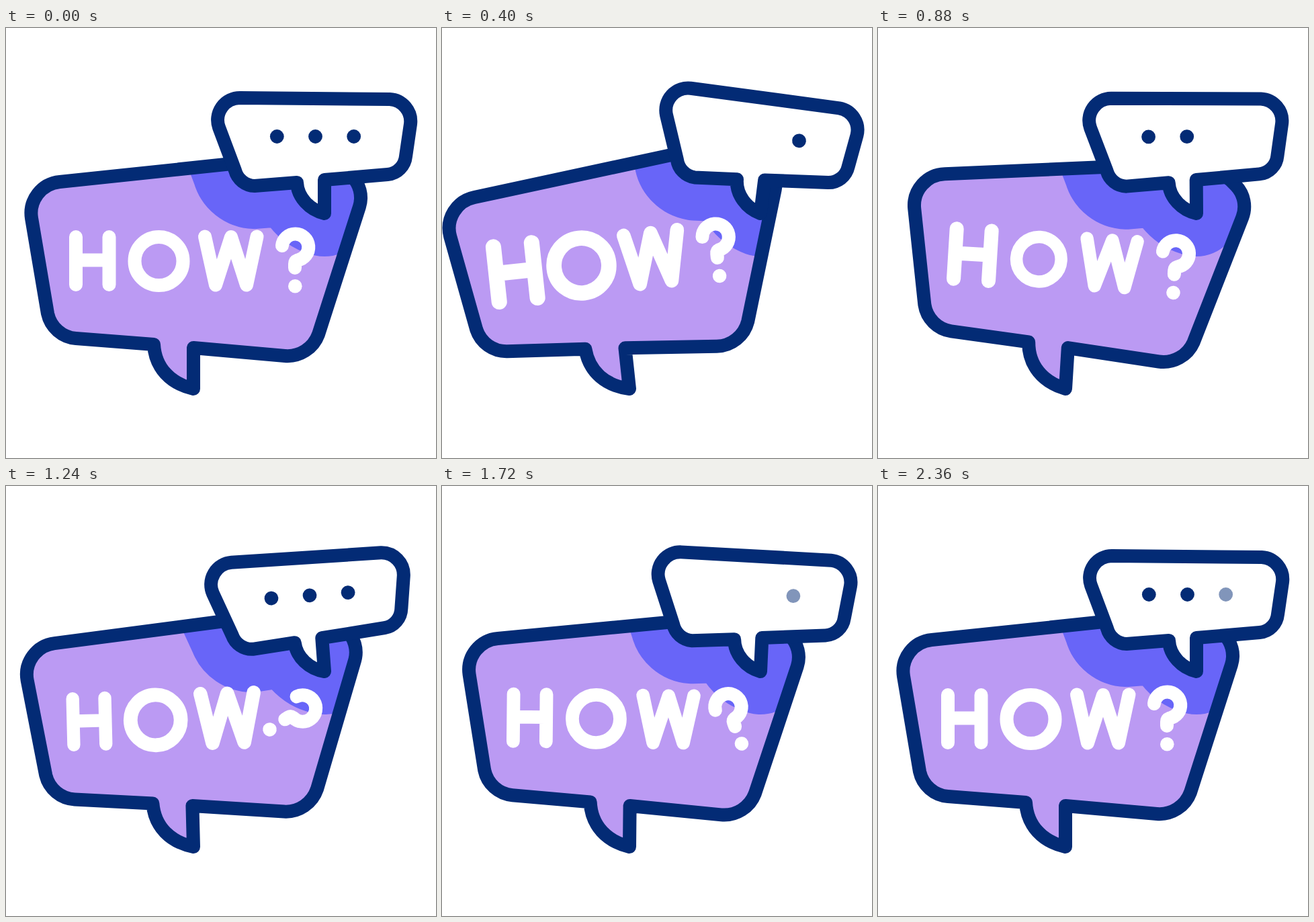
These frames come from a looping animation (640 px wide and 640 px high, 2400 ms). An HTML page:

```html
<!DOCTYPE html>
<html lang="en">
<head>
<meta charset="utf-8">
<title>How?</title>
<style>
  html, body { margin: 0; width: 100%; height: 100%; overflow: hidden; background: #fff; }
  svg { display: block; width: 100%; height: 100%; }
  .line { fill: none; stroke: #032b75; stroke-width: 20; stroke-linejoin: round; }
  .type { fill: none; stroke: #fff; stroke-width: 20; stroke-linecap: round; stroke-linejoin: round; }
  .shade { fill: #6865f8; stroke: #6865f8; stroke-width: 128; stroke-linejoin: round; }
</style>
</head>
<body>
<svg viewBox="0 0 640 640" role="img" aria-label="HOW?">
  <defs>
    <path id="bigShape" d="M80 229 L450 190 Q490 196 514 220 A45 45 0 0 1 526 266 L465 456
      A49 49 0 0 1 415 488 L279 476 V537 C245 529 222 506 220 471 L104 462
      A47 47 0 0 1 62 425 L38 283 A47 47 0 0 1 80 229 Z"/>
    <path id="smallShape" d="M348 104 L571 106 A33 33 0 0 1 602 143 L595 191
      A30 30 0 0 1 568 218 L474 226 V276 C452 271 434 252 433 230 L370 235
      A31 31 0 0 1 341 212 L317 148 A33 33 0 0 1 348 104 Z"/>
    <clipPath id="inside"><use href="#bigShape" class="big"/></clipPath>
  </defs>

  <use href="#bigShape" class="big" fill="#bb9af3"/>
  <g clip-path="url(#inside)"><use href="#smallShape" class="small shade"/></g>
  <g class="big">
    <use href="#bigShape" class="line"/>
    <g class="type">
      <path id="h" d="M104 311 V382 M153.500 311 V382 M104 345.500 H153"/>
      <circle id="o" cx="227.500" cy="347" r="36"/>
      <path id="w" d="M296 310.500 L312 382.500 L335 311 L358 382.500 L373.500 310.500"/>
      <g id="q">
        <path d="M411 324 A19.700 19.700 0 1 1 434 345.500 Q430 347 430 351 V357"/>
        <circle cx="430.300" cy="384.300" r="10.300" fill="#fff" stroke="none"/>
      </g>
    </g>
  </g>

  <g class="small">
    <use href="#smallShape" fill="#fff"/>
    <use href="#smallShape" class="line"/>
    <g id="dots" fill="#032b75"></g>
  </g>
</svg>
<script>
const LOOP = 2400, REST = 2160;
const all = s => [...document.querySelectorAll(s)];
const bigs = all('.big'), smalls = all('.small');
const [h, o, w, q, dotBox] = ['h', 'o', 'w', 'q', 'dots'].map(id => document.getElementById(id));

const dots = [0, 1, 2].map(i => {
  const dot = document.createElementNS('http://www.w3.org/2000/svg', 'circle');
  dot.setAttribute('cx', 403.3 + 57.2 * i);
  dot.setAttribute('cy', 161.5);
  dot.setAttribute('r', 10.4);
  return dotBox.appendChild(dot);
});

const clamp = x => Math.min(1, Math.max(0, x));
const ease = x => (1 - Math.cos(Math.PI * clamp(x))) / 2;

// Rocks from peak to peak, then rests at zero
function swing(...peaks) {
  const keys = [[0, 0], ...peaks, [REST, 0]];
  return t => keys.slice(1).reduce((v, [end, to], i) => {
    const [start, from] = keys[i];
    return v + (to - from) * ease((t - start) / (end - start));
  }, 0);
}
const bigTilt = swing([370, -6.3], [770, 5.3], [1130, -2.9], [1420, 1.7], [1960, -.2]);
const smallTilt = swing([370, 7.8], [620, -11.9], [1040, 5], [1320, -6.4], [1620, 3.3], [1980, -.4]);

// Swells up to its peak, then rings out
function pop(t, start, peak, period) {
  const late = t - peak;
  const wave = late < 0
    ? ease((t - start) / (peak - start))
    : Math.exp(-.0018 * late) * Math.cos(2 * Math.PI * late / period);
  return 1 + .16 * wave * clamp((REST - t) / 500);
}

const turn = (els, a, x, y) => els.forEach(e => e.setAttribute('transform', `rotate(${a} ${x} ${y})`));
const grow = (el, s, x, y) =>
  el.setAttribute('transform', `translate(${x} ${y}) scale(${s}) translate(${-x} ${-y})`);
const fade = (t, mid) => clamp((t - mid + 40) / 80);

function draw(t) {
  turn(bigs, bigTilt(t), 279, 537);
  turn(smalls, smallTilt(t), 474, 276);
  grow(h, pop(t, 0, 390, 550), 128.5, 346.5);
  grow(o, pop(t, 200, 470, 800), 227.5, 347);
  grow(w, pop(t, 280, 680, 680), 334.5, 346.5);
  turn([q], 360 * ease((t - 1022) / 826), 430.5, 345);

  // The dots go out and come back one by one, twice per loop
  const c = t % (LOOP / 2);
  dots.forEach((dot, i) =>
    dot.setAttribute('opacity', 1 - fade(c, 200 + 160 * i) + fade(c, 600 + 280 * i - (i === 1 ? 40 : 0))));
}

let start;
function tick(now) {
  start ??= now;
  draw((now - start) % LOOP);
  requestAnimationFrame(tick);
}
draw(0);
requestAnimationFrame(tick);
</script>
</body>
</html>
```
